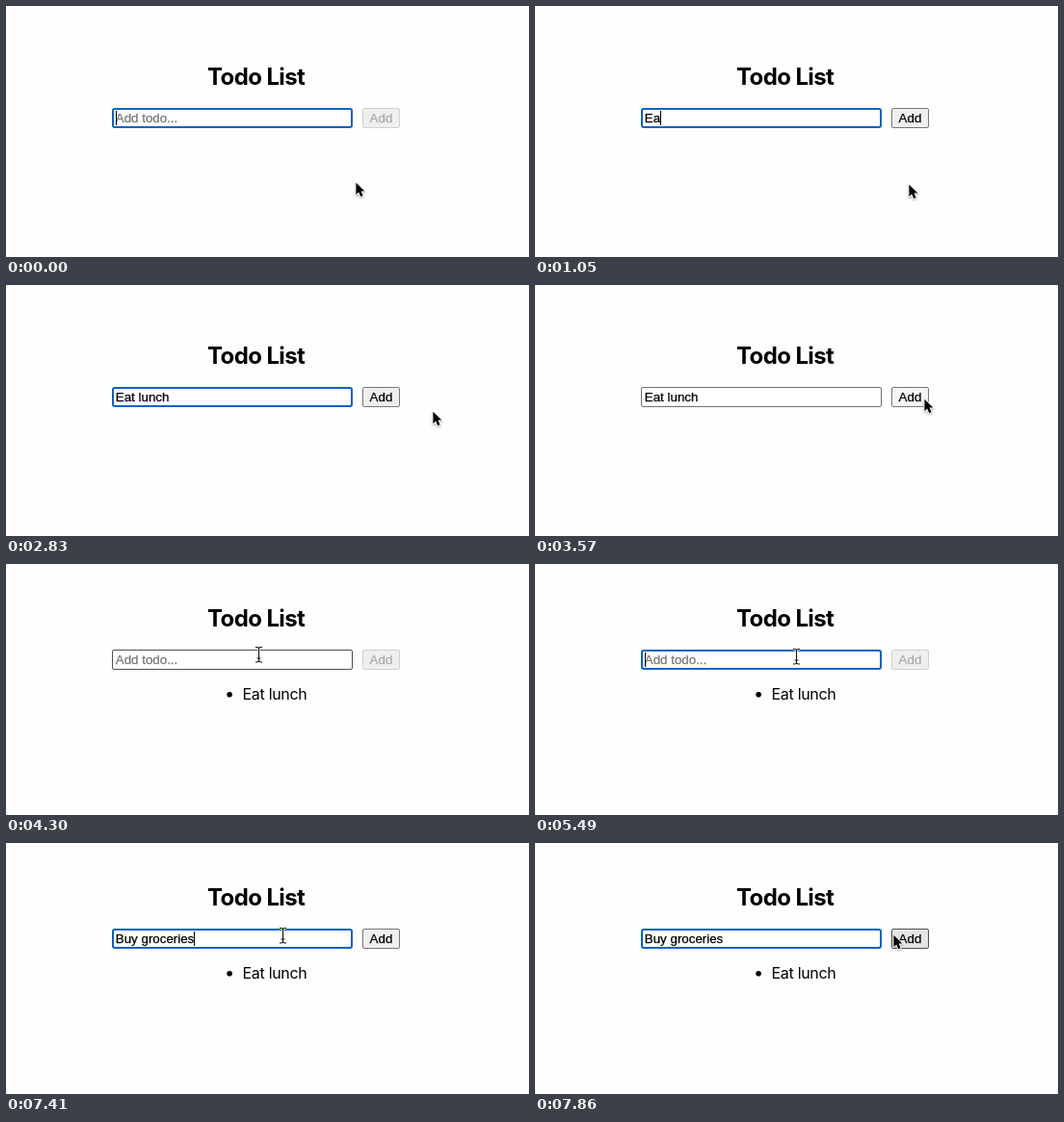
Write an HTML page with a canvas that moves like this. It is 543 px wide and 261 px high and loops after 8000 ms.

```html
<!DOCTYPE html>
<html lang="en">
<head>
<meta charset="utf-8">
<title>Todo List</title>
<style>
html, body { margin: 0; width: 100%; height: 100%; overflow: hidden; background: #fefefe; }
canvas { display: block; width: 543px; height: 261px; }
</style>
</head>
<body>
<canvas id="stage"></canvas>
<script>
const W = 543, H = 261, LOOP = 8000;
const TICK = 148.2; // the screen refreshes once per tick
const UI = '13.333px "Liberation Sans", Arial, sans-serif';
const PAGE = 'Inter, "Open Sans", sans-serif';
const canvas = document.getElementById('stage');
const ctx = canvas.getContext('2d');
const dpr = window.devicePixelRatio || 1;
canvas.width = W * dpr;
canvas.height = H * dpr;

// All times below are in ticks.
const PRESS = 24, SUBMIT = 25, REFOCUS = 30;
const BLINK = 500 / TICK;
const entries = [
  { text: 'Eat lunch', from: 5, to: 13, pace: 1.45, clear: SUBMIT },
  { text: 'Buy groceries', from: 39, to: 48, pace: 1.1, clear: Infinity }
];
const home = { x: 362, y: 182 };
const moves = [
  { from: 0, to: 1, x: 387, y: 184 },
  { from: 16, to: 19, x: 442, y: 130 },
  { from: 19, to: 21, x: 473, y: 115 },
  { from: 21, to: 24, x: 403, y: 117 },
  { from: 25, to: 29, x: 262, y: 94 },
  { from: 31, to: 32, x: 271, y: 96 },
  { from: 49, to: 53, x: 371, y: 94 }
];

const arrow = new Path2D('M1.4 1.8V14.2L4.2 11.5 6.2 16.2 8.6 15.2 6.6 10.6H10.4Z');
const beam = new Path2D('M-3.5 -8H-2Q0 -8 0 -6.5Q0 -8 2 -8H3.5M0 -6.5V6M-3.5 7.5H-2Q0 7.5 0 6Q0 7.5 2 7.5H3.5M-2 3.5H2');

const clamp = u => Math.min(1, Math.max(0, u));
const smooth = u => u * u * (3 - 2 * u);

function typedText(n) {
  const e = entries.find(e => n >= e.from && n < e.clear);
  if (!e) return '';
  const u = clamp((n - e.from) / (e.to - e.from));
  return e.text.slice(0, 1 + Math.floor((e.text.length - 1) * u ** e.pace));
}

// Blinking restarts on focus and on every key.
function caretOn(n) {
  let reset = n < REFOCUS ? -2.8 : REFOCUS;
  for (const e of entries) if (n >= e.from && n < e.clear) reset = Math.min(n, e.to);
  return (n - reset) % (2 * BLINK) < BLINK;
}

function pointerAt(n) {
  let { x, y } = home;
  for (const m of moves) {
    const u = smooth(clamp((n - m.from) / (m.to - m.from)));
    x += (m.x - x) * u;
    y += (m.y - y) * u;
  }
  return { x: Math.round(x), y: Math.round(y) };
}

function box(x, y, w, h, r, fill, line, weight) {
  const d = weight / 2;
  ctx.beginPath();
  ctx.roundRect(x + d, y + d, w - weight, h - weight, r);
  ctx.fillStyle = fill;
  ctx.fill();
  ctx.strokeStyle = line;
  ctx.lineWidth = weight;
  ctx.stroke();
}

function text(str, x, y, font, color, spacing = 0) {
  ctx.font = font;
  ctx.letterSpacing = spacing + 'px';
  ctx.fillStyle = color;
  ctx.fillText(str, x, y);
}

// Form controls have slightly heavier glyphs.
function label(str, x, y, color) {
  text(str, x, y, UI, color);
  ctx.strokeStyle = color;
  ctx.lineWidth = 0.25;
  ctx.strokeText(str, x, y);
  return ctx.measureText(str).width;
}

function drawField(n, y, value, focused, hover) {
  if (focused) box(110, y, 250, 21, 2, '#fff', '#0a62c4', 2);
  else box(110, y, 250, 21, 1.5, '#fff', hover ? '#4f4f4f' : '#707070', 1);
  const width = label(value || 'Add todo...', 113.8, y + 15, value ? '#000' : '#757575');
  if (focused && caretOn(n)) {
    ctx.fillStyle = '#000';
    ctx.fillRect(value ? Math.floor(114 + width) : 114, y + 3, 1, 15);
  }
}

function drawButton(y, enabled, hover, pressed) {
  const fill = pressed ? '#f5f5f5' : enabled && hover ? '#e5e5e5' : '#efefef';
  const line = !enabled ? '#d0d0d0' : hover && !pressed ? '#4f4f4f' : '#767676';
  box(370, y, 39, 21, 1.5, fill, line, 1);
  label('Add', 377.6, y + 15, enabled ? '#000' : '#a9a9a9');
}

function drawPointer(x, y, overField) {
  ctx.save();
  ctx.translate(x, y);
  ctx.lineJoin = 'round';
  if (overField) {
    ctx.translate(0.5, 0.5);
    ctx.strokeStyle = '#fff';
    ctx.lineWidth = 2.6;
    ctx.stroke(beam);
    ctx.strokeStyle = '#111';
    ctx.lineWidth = 1.1;
    ctx.stroke(beam);
  } else {
    ctx.shadowColor = 'rgba(0,0,0,.35)';
    ctx.shadowBlur = 2 * dpr;
    ctx.shadowOffsetY = dpr;
    ctx.strokeStyle = '#fff';
    ctx.lineWidth = 2;
    ctx.stroke(arrow);
    ctx.shadowColor = 'transparent';
    ctx.fillStyle = '#000';
    ctx.fill(arrow);
  }
  ctx.restore();
}

function draw(t) {
  const n = Math.floor(t / TICK);
  const added = n >= SUBMIT;
  const y = added ? 89 : 106;
  const value = typedText(n);
  const p = pointerAt(n);
  const over = (x, w) => p.x >= x && p.x < x + w && p.y >= y && p.y < y + 21;
  const overField = over(110, 250);

  ctx.setTransform(dpr, 0, 0, dpr, 0, 0);
  ctx.fillStyle = '#fefefe';
  ctx.fillRect(0, 0, W, H);

  text('Todo List', 209, y - 24, '700 24px ' + PAGE, '#000', -0.6);
  drawField(n, y, value, n < PRESS || n >= REFOCUS, overField);
  drawButton(y, value !== '', over(370, 39), n >= PRESS && !added);

  if (added) {
    ctx.beginPath();
    ctx.arc(232.1, 135.8, 2.8, 0, Math.PI * 2);
    ctx.fillStyle = '#000';
    ctx.fill();
    text('Eat lunch', 245.5, 141, '400 16px ' + PAGE, '#000', -0.3);
  }
  drawPointer(p.x, p.y, overField);
}

const start = performance.now();
function loop(now) {
  draw(Math.max(0, now - start) % LOOP);
  requestAnimationFrame(loop);
}
draw(0);
requestAnimationFrame(loop);
</script>
</body>
</html>
```
